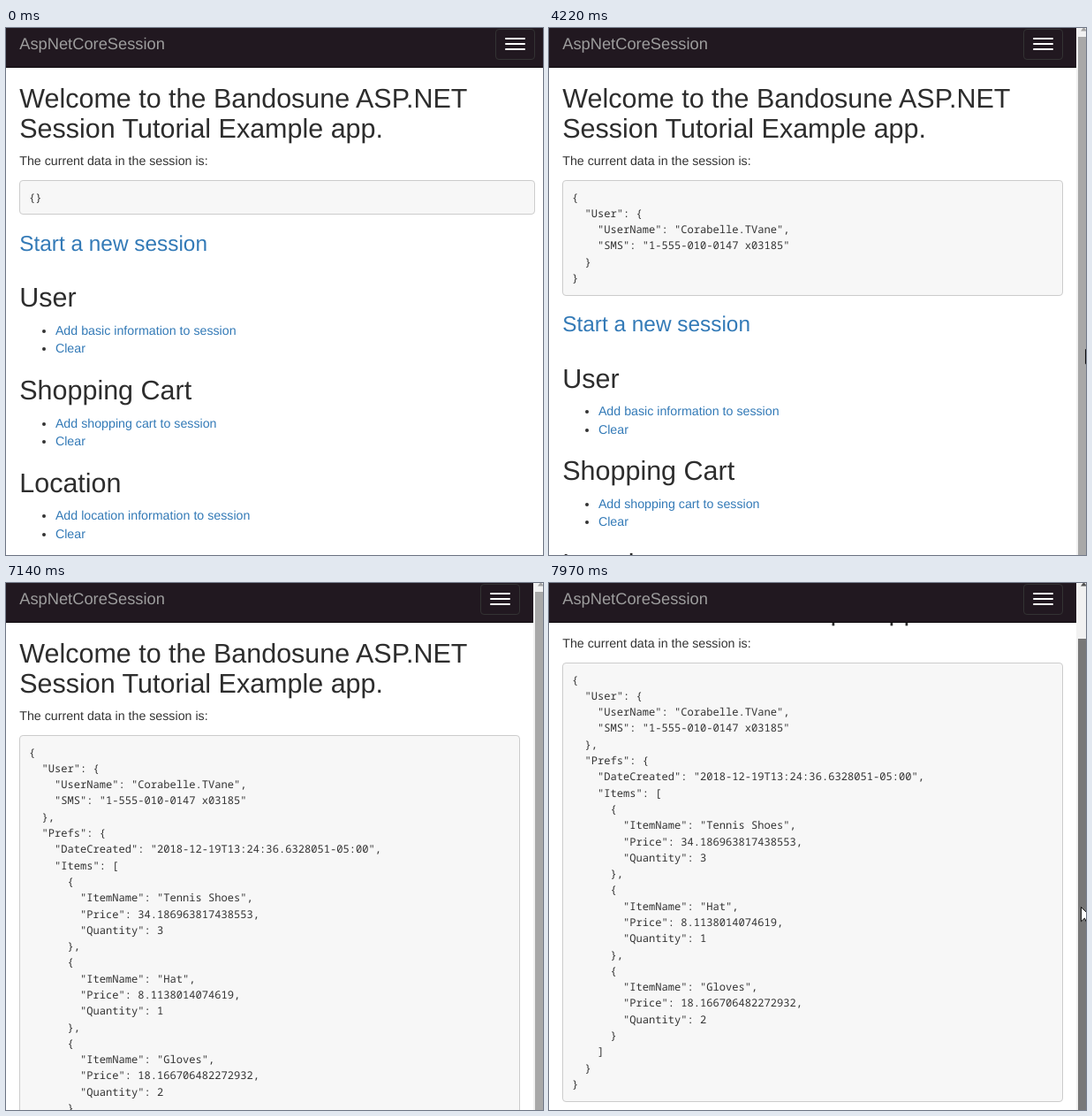
Animation, 608 px wide and 596 px high, one loop 8 s. Source, as an HTML page:

```html
<!DOCTYPE html>
<html lang="en">
<head>
<meta charset="utf-8">
<title>Session tutorial</title>
<style>
  html, body { margin: 0; width: 100%; height: 100%; overflow: hidden; background: #fff; }
  body { position: relative; font: 14px/20px "Liberation Sans", Arial, sans-serif; color: #333; text-rendering: geometricPrecision; }
  #view { position: absolute; top: -7px; left: 0; width: 614px; white-space: nowrap; }
  #scroll { position: relative; }
  #page, #bar { zoom: 1.0165; }
  #page { padding: 50px 15px 0; }
  h2, h3 { font-weight: 400; line-height: 1.1; margin: 20px 0 10px; }
  h2 { font-size: 30px; color: #2d2d2d; }
  h3 { font-size: 24px; margin-bottom: 30px; }
  p { margin: 0 0 10px; }
  ul { margin: 0 0 10px; padding-left: 40px; }
  a { color: #337ab7; }
  a.hover { color: #23527c; text-decoration: underline; }
  pre { margin: 0 0 10px; padding: 9.5px; border: 1px solid #ccc; border-radius: 4px; background: #f7f7f7;
        font: 11.913px/18px "Noto Sans Mono", monospace; }
  #bar { position: absolute; top: 0; left: 0; right: 0; height: 50px; background: #211820; border-bottom: 1px solid #0c080b; }
  #brand { position: absolute; left: 15px; top: 15px; font-size: 18px; color: #9d9d9d; }
  #menu { position: absolute; right: 15px; top: 8px; width: 22px; padding: 9px 10px; border: 1px solid #333; border-radius: 4px; }
  #menu i { display: block; height: 2px; margin-bottom: 4px; border-radius: 1px; background: #fff; }
  #menu i:last-child { margin: 0; }
  #track { position: absolute; left: 597px; top: 0; width: 17px; height: 100%; background: #f1f1f1; }
  #thumb { position: absolute; left: 2px; width: 14px; bottom: 0; }
  svg { position: absolute; left: 0; top: 0; overflow: visible; }
  #pointer path { stroke: #111; fill: #fff; }
</style>
</head>
<body>
<div id="view">
  <div id="scroll">
    <div id="page">
      <h2>Welcome to the Bandosune ASP.NET<br>Session Tutorial Example app.</h2>
      <p>The current data in the session is:</p>
      <pre id="data">{}</pre>
      <h3><a>Start a new session</a></h3>
      <h2>User</h2>
      <ul><li><a id="addUser">Add basic information to session</a></li><li><a>Clear</a></li></ul>
      <h2>Shopping Cart</h2>
      <ul><li><a id="addCart">Add shopping cart to session</a></li><li><a>Clear</a></li></ul>
      <h2>Location</h2>
      <ul><li><a>Add location information to session</a></li><li><a>Clear</a></li></ul>
    </div>
  </div>
  <div id="bar">
    <span id="brand">AspNetCoreSession</span>
    <div id="menu"><i></i><i></i><i></i></div>
  </div>
</div>
<div id="track">
  <svg width="17" height="10"><path id="up" d="M8.5-1L5 3.5H12z"/></svg>
  <div id="thumb"></div>
</div>
<svg id="pointer" width="20" height="24">
  <path id="arrow" d="M.5 .5V16.8l3.9-3.7 2.6 5.6 2.4-1-2.5-5.6h5.1z"/>
  <path id="hand" transform="translate(-6 0)" d="M5.5 13.5V2.5a1.75 1.75 0 0 1 3.5 0V8.5a1.6 1.6 0 0 1 3.1 .3a1.6 1.6 0 0 1 2.9 .6a1.5 1.5 0 0 1 2.5 1.2V16.5c0 3-2 6-5 6H9.5c-2 0-3-1-4-2.5L1 14c-1-1.6 1-3 2.3-1.8zM9 8.5v4M12.1 8.8v3.7M15 9.4v3.1"/>
</svg>
<script>
const LOOP = 8000, STEP = 30;
const $ = id => document.getElementById(id);

const user = `  "User": {
    "UserName": "Corabelle.TVane",
    "SMS": "1-555-010-0147 x03185"
  }`;
const item = (name, price, count) => `      {
        "ItemName": "${name}",
        "Price": ${price},
        "Quantity": ${count}
      }`;
const items = [
  item("Tennis Shoes", "34.186963817438553", 3),
  item("Hat", "8.1138014074619", 1),
  item("Gloves", "18.166706482272932", 2)
].join(",\n");
const prefs = `  "Prefs": {
    "DateCreated": "2018-12-19T13:24:36.6328051-05:00",
    "Items": [
${items}
    ]
  }`;
const sessions = ["{}", `{\n${user}\n}`, `{\n${user},\n${prefs}\n}`];

const out = p => 1 - (1 - p) ** 3;
const inOut = p => p * p * (3 - 2 * p);
const pull = p => 0.175 * p + 0.825 * p * p;

// start, end, from x, from y, to x, to y, easing
const moves = [
  [1130, 1820, 587, 312, 225, 339, out],
  [3480, 4020, 225, 339, 612, 366, inOut],
  [4220, 4590, 607, 363, 607, 363, inOut],
  [4590, 4860, 607, 363, 604, 390, inOut],
  [4950, 5400, 604, 390, 233, 499, inOut],
  [5400, 5550, 233, 499, 219, 499, out],
  [6480, 7170, 219, 499, 611, 313, inOut],
  [7340, 7970, 606, 313, 602, 366, pull]
];

function pointerAt(t) {
  const move = moves.filter(m => m[0] <= t).pop();
  if (!move) return [700, 312];
  const [start, end, x0, y0, x1, y1, ease] = move;
  const passed = Math.floor((t - start) / STEP) * STEP;
  const p = ease(Math.min(1, passed / (end - start)));
  return [x0 + (x1 - x0) * p, y0 + (y1 - y0) * p].map(Math.round);
}

const within = (t, a, b) => t >= a && t < b;
const show = (el, on) => { el.style.display = on ? "" : "none"; };

let shown = 0;
function render(t) {
  const state = t < 2250 ? 0 : t < 6180 ? 1 : 2;
  const [x, y] = pointerAt(t);
  if (state !== shown) {
    $("data").textContent = sessions[state];
    $("view").style.width = state ? "597px" : "614px";
    shown = state;
  }

  let drag = 0, ratio = 1;
  if (within(t, 4590, 6180)) {
    drag = Math.min(19, y - 363);
    ratio = 0.905;
  } else if (t >= 7340) {
    drag = y - 313;
    ratio = 0.646;
  }
  $("scroll").style.top = -Math.round(drag / ratio) + "px";

  const pressed = within(t, 4620, 4980) || t >= 7370;
  show($("track"), state > 0);
  $("thumb").style.top = 10 + drag + "px";
  $("thumb").style.background = pressed ? "#787878" : x >= 597 ? "#a8a8a8" : "#c1c1c1";
  $("up").style.fill = drag ? "#505050" : "#a3a3a3";

  const onUser = state === 0 && x < 261;
  const onCart = within(t, 5430, 6180);
  $("addUser").className = onUser ? "hover" : "";
  $("addCart").className = onCart ? "hover" : "";

  const hand = onUser || within(t, 2250, 3510) || within(t, 5430, 6510);
  show($("hand"), hand);
  show($("arrow"), !hand);
  $("pointer").style.transform = `translate(${x}px, ${y}px)`;
}

const origin = performance.now();
function tick() {
  render((performance.now() - origin) % LOOP);
  requestAnimationFrame(tick);
}
tick();
</script>
</body>
</html>
```
